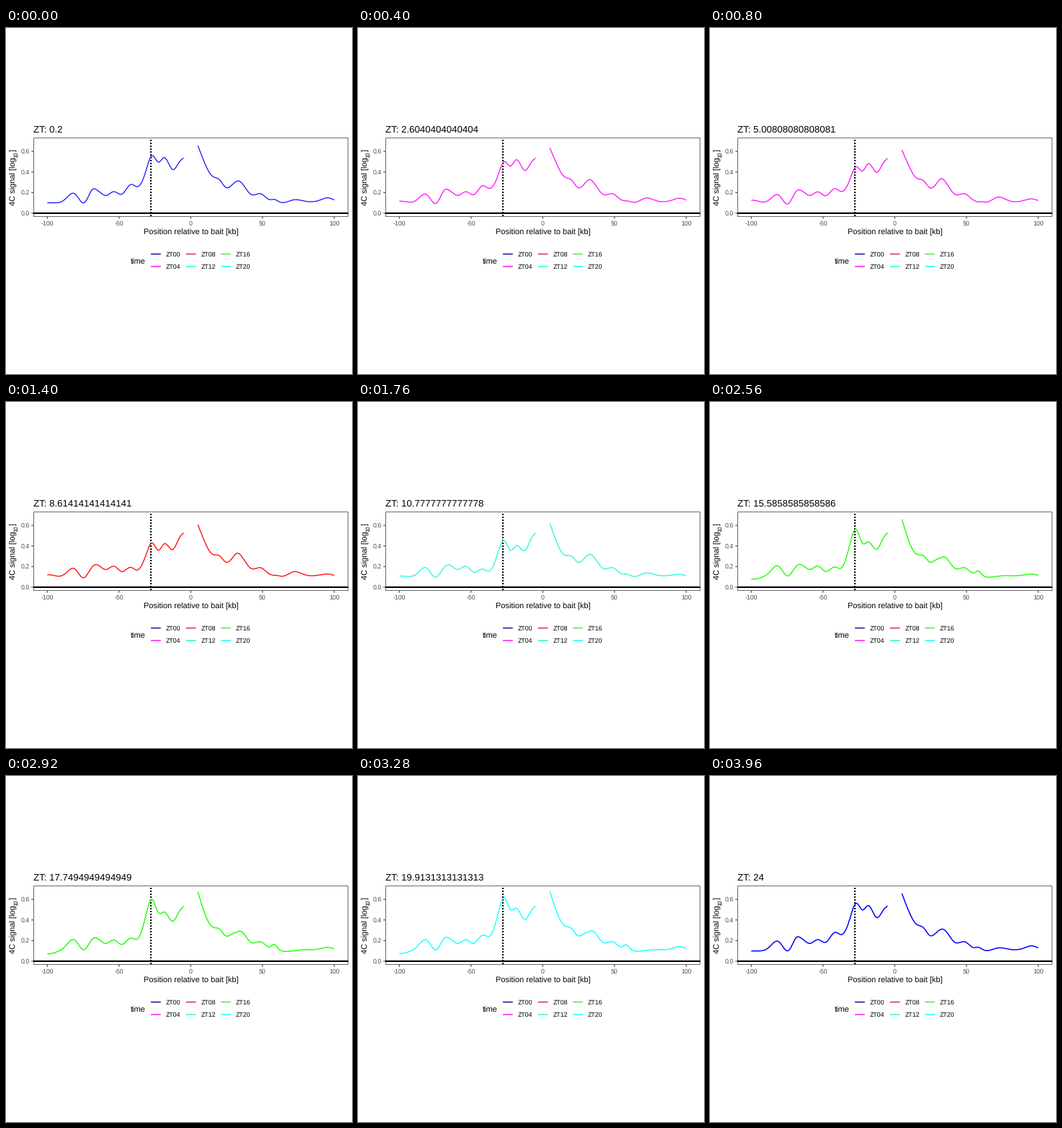
A matplotlib script that plays this animation: 480 px wide and 480 px high, repeating every 4000 ms.

```python
import math

import numpy as np
import matplotlib.pyplot as plt
from matplotlib.animation import FuncAnimation
from matplotlib.patches import Rectangle

SIZE, FRAMES, STEP = 480, 100, 40
PX = 0.72  # points per pixel at 100 dpi
START, END = 0.2, 24.0

plt.rcParams["font.family"] = ["Liberation Sans", "DejaVu Sans"]
plt.rcParams["text.hinting"] = "none"

# Daily mean of the signal: turning points (kb, level) on each side of the bait
LEFT = [(-100, .099), (-96, .099), (-88, .131), (-81, .191), (-74.5, .1),
        (-68.5, .214), (-59, .172), (-53.5, .206), (-48, .164), (-42, .226),
        (-37, .209), (-32, .349), (-27, .52), (-22.5, .432), (-18.5, .472),
        (-12.5, .388), (-8, .484), (-5, .531)]
RIGHT = [(5, .641), (10, .452), (14, .349), (16, .329), (20, .313), (24.5, .245),
         (28.5, .27), (34, .309), (42, .182), (49, .188), (55, .132), (58, .136),
         (62, .109), (72, .129), (80, .115), (90, .122), (95.5, .136), (100, .12)]

# Daily rhythm: bumps (height, centre, width) that swell with the hour
COS_SWING = [(.055, -40, 8), (.07, -20, 9), (.027, 12, 9), (.013, 96, 6),
             (.018, -69, 3)]
SIN_SWING = [(-.085, -28, 6.5), (.028, -99, 6), (-.016, -80, 9), (-.034, 4, 4),
             (.026, 32, 3), (-.027, 58, 2.5), (.028, 72, 6)]

COLORS = ["#0000ff", "#ff00ff", "#ff0000", "#2df5da", "#1cff00", "#1effff"]
KEY_COLORS = ["#0000a0", "#ff00ff", "#d0203c", "#20f5d0", "#50dd50", "#00ffff"]


def spline(points, xs):
    """Natural cubic spline through the points, evaluated at xs."""
    x, y = np.array(points, float).T
    h, n = np.diff(x), len(x)
    a, b = np.eye(n), np.zeros(n)
    for i in range(1, n - 1):
        a[i, i - 1:i + 2] = h[i - 1], 2 * (h[i - 1] + h[i]), h[i]
        b[i] = 6 * ((y[i + 1] - y[i]) / h[i] - (y[i] - y[i - 1]) / h[i - 1])
    m = np.linalg.solve(a, b)
    k = np.clip(np.searchsorted(x, xs) - 1, 0, n - 2)
    u, v, w = x[k + 1] - xs, xs - x[k], h[k]
    return ((m[k] * u**3 + m[k + 1] * v**3) / (6 * w)
            + (y[k] / w - m[k] * w / 6) * u
            + (y[k + 1] / w - m[k + 1] * w / 6) * v)


def bumps(parts, xs):
    return sum(h * np.exp(-((xs - c) / w) ** 2) for h, c, w in parts)


def px(kb):
    return 256.3 + 1.99 * kb


def py(value):
    return 256.9 - 143 * value


fig = plt.figure(figsize=(SIZE / 100, SIZE / 100), dpi=100, facecolor="white")
ax = fig.add_axes([0, 0, 1, 1])
ax.set_xlim(0, SIZE)
ax.set_ylim(SIZE, 0)
ax.axis("off")


def line(x, y, color, width, **kw):
    return ax.plot(x, y, color=color, lw=width * PX, snap=False,
                   solid_capstyle="butt", **kw)[0]


def label(x, y, text, size, color="black", **kw):
    return ax.text(x, y, text, fontsize=size * PX, color=color,
                   va="baseline", **kw)


# Panel, axes and guides
ax.add_patch(Rectangle((38.5, 152.5), 436, 109, fill=False, ec="#6b6b6b",
                       lw=PX, zorder=3, snap=False))
for kb in range(-100, 101, 50):
    line([px(kb)] * 2, [262, 264.7], "#333333", 1.07)
    label(px(kb), 273.6, str(kb), 8.8, "#4d4d4d", ha="center")
for tick in (0, 0.2, 0.4, 0.6):
    line([35.3, 38], [py(tick)] * 2, "#333333", 1.07)
    label(33.2, py(tick) + 2.8, f"{tick:.1f}", 8.8, "#4d4d4d", ha="right")
line([38, 475], [py(0)] * 2, "black", 2.13, zorder=4)
line([201, 201], [261, 153], "black", 2, zorder=4, dashes=(1, 1),
     dash_capstyle="butt")

label(256.3, 286.6, "Position relative to bait [kb]", 11, ha="center")
up = dict(rotation=90, rotation_mode="anchor", ha="left")
label(14, 246.5, "4C signal [log", 11, **up)
label(16, 179.8, "10", 7.7, **up)
label(14, 171.2, "]", 11, **up)

# Legend
label(172.5, 327.4, "time", 11)
for i, color in enumerate(KEY_COLORS):
    x = 201 + 48.6 * (i // 2)
    y = 313.6 + 17.28 * (i % 2)
    line([x, x + 13.8], [y, y], color, 1.4)
    label(x + 20.7, y + 3.4, f"ZT{4 * i:02d}", 8.8)

title = label(38, 145, "", 13.3)


def make_side(points):
    xs = np.linspace(points[0][0], points[-1][0], 300)
    curve = line(px(xs), xs * 0, "blue", 1.2, zorder=5)
    return curve, spline(points, xs), bumps(COS_SWING, xs), bumps(SIN_SWING, xs)


sides = [make_side(LEFT), make_side(RIGHT)]


def update(i):
    zt = START + (END - START) * i / (FRAMES - 1)
    angle = 2 * math.pi * zt / 24
    title.set_text(f"ZT: {zt:.15g}")
    for curve, mean, cos_part, sin_part in sides:
        curve.set_ydata(py(mean + math.cos(angle) * cos_part
                           + math.sin(angle) * sin_part))
        curve.set_color(COLORS[int(zt / 4 + 0.5) % 6])
        curve.set_linewidth((1.15 + 0.35 * zt / END) * PX)
    return [title] + [side[0] for side in sides]


anim = FuncAnimation(fig, update, frames=FRAMES, interval=STEP, repeat=True,
                     repeat_delay=0, blit=False)
plt.show()
```
